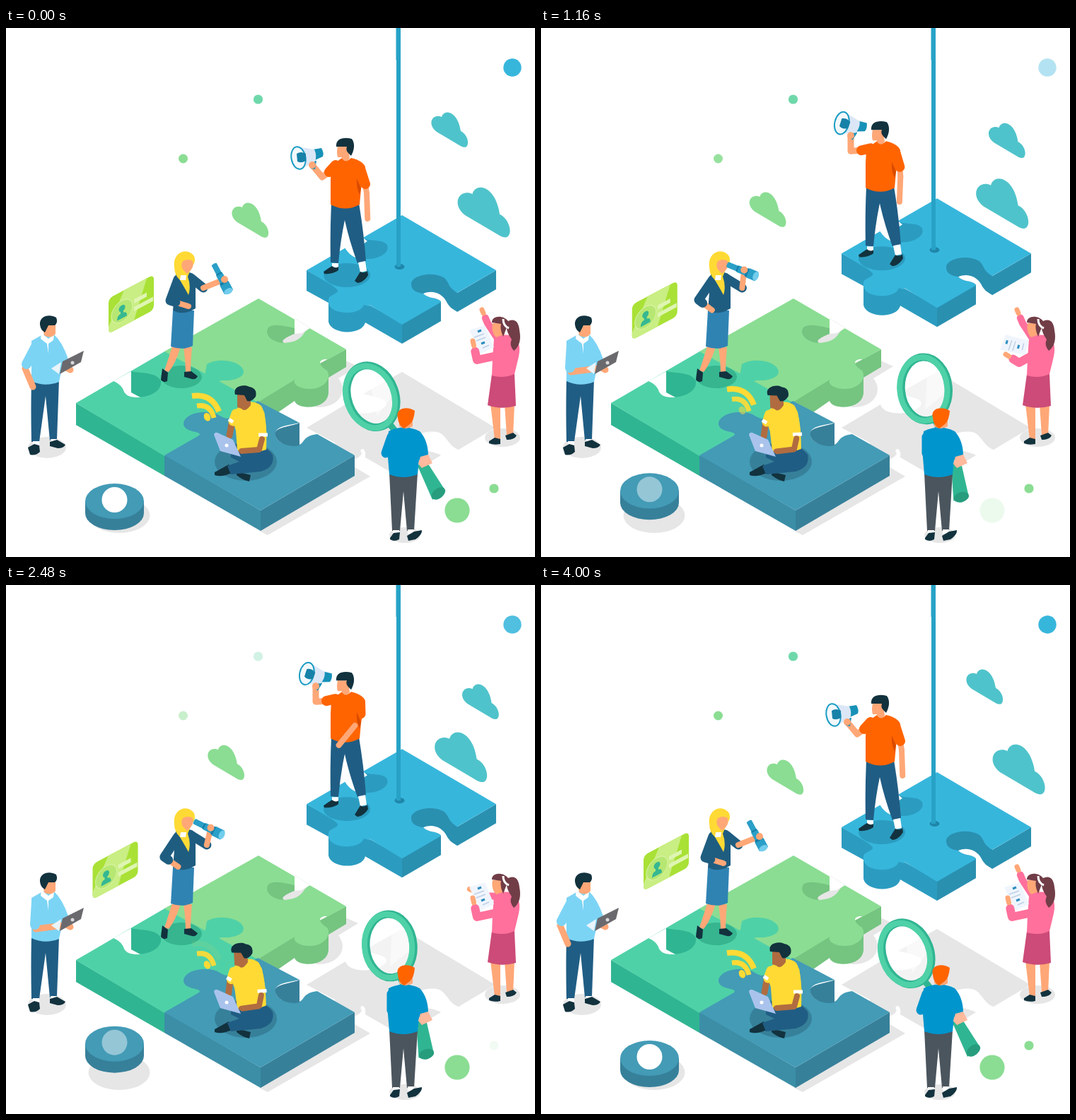
An HTML page that plays this animation: 748 px wide and 749 px high, repeating every 4.04 s.

```html
<!DOCTYPE html>
<html lang="en">
<head>
<meta charset="utf-8">
<title>Puzzle team</title>
<style>
html, body { margin: 0; height: 100%; overflow: hidden; background: #fff; }
svg { display: block; width: 100vw; height: 100vh; }
.limb { fill: none; stroke-linecap: round; stroke-linejoin: round; }
.skin { fill: #ffa777; } path.limb.skin { fill: none; stroke: #ffa777; }
.jean { fill: #205d84; }
.dark { fill: #12323e; }
.ground { fill: #e6e6e6; }
.teal { fill: #4fd1a7; }
.steel { fill: #439bb6; }
</style>
</head>
<body>
<svg viewBox="0 0 748 749">
<defs>
  <path id="cloud" d="M1 17C-2 7 7 1 15 5C18-7 38-4 42 25C51 29 55 43 50 47C47 49 43 47 40 45L8 26C4 23 2 20 1 17Z"/>
</defs>

<!-- dots and clouds -->
<circle id="dotA" cx="716" cy="56" r="12.7" fill="#37b6dc"/>
<circle id="dotB" cx="356.500" cy="101" r="6.600" fill="#6fd8ab"/>
<circle id="dotC" cx="250.500" cy="185" r="6.500" fill="#8bdd93"/>
<circle id="dotD" cx="638" cy="683" r="17.600" fill="#8bdd93"/>
<circle id="dotE" cx="690" cy="652" r="6.600" fill="#8bdd93"/>
<use href="#cloud" id="cloudA" fill="#8bdd93"/>
<use href="#cloud" id="cloudB" fill="#4fc3cb"/>
<use href="#cloud" id="cloudC" fill="#4fc3cb"/>

<!-- ground shadows -->
<g class="ground">
  <path d="M560 487L692 566L640 597C627 593 624 579 613 573C596 568 572 577 573 588C576 599 602 597 615 605L560 638L508 608C510 590 497 596 503 602C498 617 464 613 458 599C458 590 470 589 463 586L425 566L480 533C484 549 520 549 535 537C546 525 522 523 505 518Z"/>
  <path d="M358 712L370 718L515 635L490 620ZM478 470L498 479L470 496C485 515 470 538 440 537L420 528Z"/>
  <ellipse cx="160" cy="690" rx="43.500" ry="25"/>
  <ellipse cx="58" cy="594" rx="27" ry="15"/>
  <ellipse cx="564" cy="718" rx="22" ry="11"/>
  <ellipse cx="702" cy="580" rx="25" ry="13"/>
</g>

<!-- joined pieces -->
<path fill="#75c480" d="M481 455V480L456 495V517C454 541 412 541 408 528L385 544L350 525Z"/>
<path fill="#30b592" d="M99 531L224 605V634L99 562Z"/>
<path fill="#3b8ea6" d="M224 604L360 683V712L224 634Z"/>
<path fill="#37809a" d="M360 683L493 605V634L360 712Z"/>
<path class="teal" d="M99 531L226 457L360 530L224 606Z"/>
<path fill="#8bdd93" d="M357 383L481 455L456 469C438 468 443 479 454 485C461 496 450 511 430 511C409 511 404 500 410 497L356 530L224 458Z"/>
<path fill="#75c480" d="M408 411V425C398 423 379 417 371 424C364 435 378 446 394 446L430 425Z"/>
<path class="ground" d="M408 411L430 425C417 430 424 443 394 446C386 443 398 437 408 433Z"/>
<path fill="#fff" d="M408 411L430 425L418 432L408 433Z"/>
<path fill="#30b592" d="M177 486C190 489 214 487 219 500C221 514 203 524 180 523L168 518Z"/>
<path fill="#fff" d="M152 500L177 486V516L190 523Q171 524 167 515Q164 505 152 500Z"/>
<path class="teal" d="M284 476C298 467 328 470 335 483C340 494 323 500 306 499C296 500 300 505 303 511L280 498Z"/>
<path class="steel" d="M224 605L273 577C279 570 253 574 251 561C250 547 279 539 299 547C308 552 313 556 321 549L356 528L415 559C402 562 387 563 382 570C377 582 390 591 407 591C425 592 415 578 440 575L493 605L360 683Z"/>
<path fill="#37809a" d="M415 559V591C398 595 378 585 381 572C386 564 405 564 415 559Z"/>

<!-- disc -->
<g id="disc">
  <path fill="#37809a" d="M112 670V687A41.500 24 0 0 0 195 687V670Z"/>
  <ellipse class="steel" cx="153.500" cy="670" rx="41.500" ry="25"/>
  <circle id="badge" cx="153.500" cy="668" r="18" fill="#fff"/>
</g>

<!-- hanging piece with speaker -->
<path fill="#27a2c6" d="M551.500 0H555V45H551.500Z"/>
<g id="lift">
  <path fill="#2b9cc0" d="M425 343V372L456 389V416C460 435 504 435 508 417L560 447V418Z"/>
  <path fill="#2a90b0" d="M693 343V370L638 402V375ZM560 418V447L615 415V380Z"/>
  <path fill="#37b6dc" d="M560 265L693 343L560 420L514 392C507 376 493 374 503 383C512 393 500 403 483 403C463 403 452 394 457 381C470 373 474 374 462 365L425 343Z"/>
  <path fill="#37b6dc" d="M498 373Q515 377 514 394L480 385Z"/>
  <path fill="#2a90b0" d="M573 363C572 351 602 343 620 354C627 361 625 367 638 375V402L615 387C607 380 598 384 590 376C582 375 573 372 573 363Z"/>
  <path fill="#fff" d="M590 376C604 370 617 377 622 386Q627 397 638 402L615 416V387C607 380 598 384 590 376Z"/>
  <path fill="#2b9cc0" d="M505 297C512 303 530 298 538 306C545 317 528 327 512 327C498 328 485 322 480 311Z"/>
  <path fill="#fff" d="M479 311L505 297L511 302Q498 309 494 325Q485 321 479 311Z"/>
  <ellipse cx="556.500" cy="338" rx="7" ry="4" fill="#1f86aa"/>
  <path stroke="#27a2c6" stroke-width="6" d="M555 -60V338"/>
  <ellipse cx="482" cy="350" rx="33" ry="17" fill="#2b9cc0"/>

  <path class="jean" d="M460 248H499Q506 290 509 330L497 333Q485 300 479 272Q473 300 470 333L459 332Q458 290 460 248Z"/>
  <path fill="#fff" d="M461 333H470V341H461ZM498 332L508 330L510 344L501 346Z"/>
  <path class="dark" d="M449 345L461 337Q466 341 470 338V343Q462 349 450 348ZM493 358L501 345Q507 348 511 344L512 350Q506 360 497 361Z"/>
  <path class="limb skin" id="manArm" stroke-width="8"/>
  <path fill="#ff6400" d="M460 195L475 184Q482 191 488 184Q505 188 508 197L502 228L500 250Q480 261 459 250V215Z"/>
  <path class="limb" id="manSleeve" stroke="#ff6400" stroke-width="14"/>
  <path fill="#d94b00" d="M496 213L502 227L500 236Q495 226 496 213Z"/>
  <path class="limb skin" id="manFore" stroke-width="8"/>
  <path class="skin" d="M469 168H484L486 185Q481 192 475 185V183H469Q467 176 469 168Z"/>
  <path class="dark" d="M467 168C466 156 478 154 489 157C495 165 491 176 488 181L484 177Q480 173 482 168Z"/>
  <path class="limb skin" id="hornArm" stroke-width="9"/>
  <path class="limb" id="hornSleeve" stroke="#ff6400" stroke-width="14"/>
  <g id="horn">
    <path fill="#1791b8" d="M427 188L439 188L437 200L431 199ZM434 172L446 170Q450 177 448 182L437 187Z"/>
    <path fill="#dbe7f6" d="M412 168L436 172Q440 180 437 189L416 200Z"/>
    <ellipse cx="413.500" cy="184" rx="10" ry="16" transform="rotate(-10 413.500 184)" fill="#f2f8fc" stroke="#1c9dc4" stroke-width="2"/>
    <path fill="#1781a8" d="M411 178Q417 174 424 178V188Q417 192 412 189Z"/>
  </g>
  <circle class="skin" id="hornHand" r="5"/>
</g>

<!-- floating card -->
<g id="card">
  <rect width="64" height="50" rx="6" fill="#a9e136"/>
  <path fill="#c9ee83" d="M22 0H54L36 50H6Q0 50 0 44V40Z"/>
  <circle cx="19" cy="28" r="15" fill="#b7e773" stroke="#d9f3a6"/>
  <circle cx="19" cy="24" r="4.500" fill="#35b891"/>
  <path fill="#35b891" d="M17 27H21V31Q26 31 26 38H12Q12 31 17 31Z"/>
  <path fill="#def5b2" d="M36 20H54V26H36ZM36 31H63V37H36Z"/>
</g>

<!-- woman with telescope -->
<ellipse cx="248" cy="494" rx="29" ry="16" fill="#36b58f"/>
<path class="skin" d="M235 451H247Q240 475 230 487L224 485Q229 470 235 451ZM251 452H263Q261 470 261 489L254 488Q254 470 251 452Z"/>
<path class="dark" d="M221 482L229 488L228 500Q222 503 219 498ZM252 487L262 486L271 493Q269 498 263 497L252 494Z"/>
<path fill="#2f83b3" d="M236 400H266L264 450Q250 457 233 451Z"/>
<path class="limb" id="scopeSleeve" stroke="#1f5d80" stroke-width="13"/>
<path fill="#1f5d80" d="M240 349Q262 341 268 352V397Q252 408 236 400L238 375Z"/>
<path class="limb skin" id="hipArm" stroke-width="8"/>
<path class="limb" id="hipSleeve" stroke="#1f5d80" stroke-width="13"/>
<path fill="#ffda35" d="M238 338C235 318 256 309 266 323Q269 332 263 337L257 352Q262 366 258 378Q252 367 246 357Q238 350 238 338Z"/>
<path class="skin" d="M250 330Q258 326 264 330Q266 338 261 343L256 348L251 343Q246 337 250 330Z"/>
<path fill="#fff" d="M247 350L255 350L254 357L246 357Z"/>
<path class="limb skin" id="scopeArm" stroke-width="8"/>
<g id="scope">
  <path fill="#2a9fc7" d="M-23 -4H-9L-7 -5H5L8 -7H21Q26 0 21 7H8L5 5H-7L-9 4H-23Q-25 0 -23 -4Z"/>
  <path fill="#177ca5" d="M-9 -4H-7V4H-9ZM5 -6H8V6H5Z"/>
  <ellipse cx="20" rx="4" ry="6.500" fill="#72cdec"/>
</g>
<circle class="skin" id="scopeHand" r="5"/>

<!-- man with tablet -->
<path class="jean" d="M36 498H75L72 583L62 584L56 521L47 586H36Q35 540 36 498Z"/>
<path fill="#fff" d="M38 585H47V592H38ZM63 582H72V588H63Z"/>
<path class="dark" d="M31 594L40 589L47 591L48 600Q42 606 34 604ZM62 586L72 583L84 590Q82 595 73 595L62 592Z"/>
<path class="limb skin" stroke-width="9" d="M80 478L91 484"/>
<path fill="#7cd4f5" d="M36 443L52 434H68Q80 445 88 469L78 487L75 501Q55 509 36 500Z"/>
<path fill="#fff" d="M50 432L60 440L68 434L67 442L60 447L60 461L58 447L49 440Z"/>
<path class="skin" d="M51 419H70V433Q63 441 54 435Z"/>
<path class="dark" d="M48 420C47 408 61 404 71 410Q74 417 69 421H60L55 431Q49 428 48 420Z"/>
<path class="limb skin" id="tabArm" stroke-width="9"/>
<path class="limb" id="tabSleeve" stroke="#7cd4f5" stroke-width="14"/>
<path fill="#eaf4fb" d="M64 482L78 473L75 490Z"/>
<path fill="#6a6a6e" d="M80 472L110 457L106 473L76 490Z"/>
<circle cx="94" cy="474" r="2.500" fill="#d9d9db"/>

<!-- signal -->
<g id="signal" fill="none" stroke="#ffda35" stroke-width="8">
  <path id="arcOut" d="M263 521Q291 517 301 543"/>
  <path id="arcIn" d="M270 535Q289 532 294 552" stroke-width="7"/>
  <ellipse id="arcDot" cx="284.500" cy="551" rx="4.500" ry="6" transform="rotate(-25 284 551)" fill="#ffda35" stroke="none"/>
</g>

<!-- seated man -->
<ellipse cx="339" cy="614" rx="44" ry="27" fill="#37809a"/>
<path class="dark" d="M295 629L315 618L321 629Q305 637 295 633ZM326 628L346 633L344 642Q334 640 326 633Z"/>
<path class="jean" d="M322 590Q362 584 377 604Q381 622 360 628L318 632L313 620L338 611L320 604Z"/>
<g id="sitter">
  <path fill="#ffda35" d="M318 546L331 535Q348 524 361 535Q370 550 368 597Q345 605 327 598L325 570Z"/>
  <path class="limb" stroke="#b06c40" stroke-width="9" d="M320 555L316 577"/>
  <path class="limb" stroke="#ffda35" stroke-width="13" d="M325 546L321 557M359 546L362 574"/>
  <path stroke="#fff" stroke-width="5" d="M357 576H370M315 554L321 558"/>
  <path class="limb" stroke="#b06c40" stroke-width="8" d="M362 582L358 597L333 599"/>
  <path fill="#b06c40" d="M327 518H346V534Q338 545 333 539L327 537Z"/>
  <path class="dark" d="M324 519C320 506 338 504 344 508Q356 510 353 522Q347 530 341 528L337 520Z"/>
</g>
<path class="jean" d="M318 590Q340 612 346 610L336 617L318 608Z"/>
<path fill="#a9c3ec" d="M294 576Q295 572 299 573L321 583L332 607L303 599Z"/>
<circle cx="312" cy="591" r="2.500" fill="#fff"/>

<!-- magnifier and its holder -->
<g id="handle">
  <path fill="#30b592" d="M582 620L593 611L620 653L603 668Z"/>
  <ellipse cx="611.500" cy="659" rx="11" ry="7" fill="#279d7e" transform="rotate(-38 611.500 659)"/>
</g>
<g id="glass">
  <path stroke="#30b592" stroke-width="9" d="M542 560L560 583"/>
  <g transform="rotate(-20 516 522)">
    <ellipse cx="516" cy="522" rx="33" ry="44" fill="#fff" fill-opacity=".55"/>
    <path fill="#fff" opacity=".5" d="M521 507L545 494L546 530L515 551Z"/>
    <ellipse cx="517" cy="522" rx="33.500" ry="45" fill="none" stroke="#30b592" stroke-width="11"/>
    <ellipse cx="515" cy="522" rx="33.500" ry="45" fill="none" stroke="#4fd1a7" stroke-width="8"/>
  </g>
</g>
<path fill="#4b555d" d="M542 630H582L577 712H567L562 656L557 712H546Z"/>
<path fill="#fff" d="M547 711H556V717H547ZM568 710H577V716H568Z"/>
<path class="dark" d="M543 722L548 715L557 714L556 724Q549 728 543 724ZM567 719L577 713L588 711Q589 717 579 724L569 726Z"/>
<path fill="#0095cd" d="M541 571Q563 560 585 571Q597 584 597 606L584 612L582 632Q562 640 542 632L539 596Z"/>
<path class="limb" id="backSleeve" stroke="#0095cd" stroke-width="13"/>
<path fill="#ffb99c" d="M586 607L597 604L603 616L588 623L583 617Z"/>
<path class="skin" d="M556 552H575V564Q565 570 556 564Z"/>
<path fill="#ff6400" d="M554 552C550 536 570 536 578 542Q577 556 571 561L563 567Q555 563 554 552Z"/>

<!-- woman with paper -->
<path class="skin" d="M685 532H699V583H691ZM705 533H719L717 577H708Z"/>
<path class="dark" d="M683 585L691 580L699 582V589Q690 591 683 588ZM706 577L717 573L722 577Q719 583 708 583Z"/>
<path fill="#cc4b78" d="M687 490H719L721 535Q700 541 681 534Z"/>
<path class="limb" id="upSleeve" stroke="#ff709c" stroke-width="10"/>
<path class="limb skin" id="upHand" stroke-width="7"/>
<path class="skin" d="M688 418H705V434Q697 442 691 436Q686 428 688 418Z"/>
<path fill="#ff709c" d="M690 440Q705 431 718 437Q729 445 725 465L719 490Q703 497 687 492L688 468Z"/>
<path fill="#713d47" d="M687 417C687 407 703 406 710 415Q724 409 726 428Q730 448 718 457Q711 449 715 441Q708 431 708 424L703 437Q698 426 700 419Z"/>
<path fill="none" stroke="#fff" stroke-width="3" d="M703 412Q703 422 711 425"/>
<g id="paper">
  <path fill="#f0f5fd" d="M655 428L677 421L690 452L671 461Z"/>
  <path stroke="#2e8fc0" stroke-width="3" d="M667 430L672 428M672 447L677 445"/>
  <path stroke="#bfd0e6" stroke-width="1.500" d="M662 438L676 433M665 443L678 438M674 453L683 449"/>
</g>
<path class="limb" id="lowSleeve" stroke="#ff709c" stroke-width="12"/>
<path class="limb skin" id="lowHand" stroke-width="7"/>
</svg>

<script>
const $ = id => document.getElementById(id);
const move = (id, v) => $(id).setAttribute('transform', v);
const mix = (a, b, k) => a.map((v, i) => v + (b[i] - v) * k);
const line = (id, ...points) => $(id).setAttribute('d', 'M' + points.join('L'));
const alpha = (id, v) => $(id).setAttribute('opacity', v);
const clamp = v => Math.max(0, Math.min(1, v));
const ease = (t, a, b) => { const k = clamp((t - a) / (b - a)); return k * k * (3 - 2 * k); };
// Rises over a..b and falls over c..d.
const pulse = (t, a, b, c, d) => ease(t, a, b) - ease(t, c, d);
// Fully faded at the centre, solid beyond the half width.
const dip = (t, centre, half) => clamp(Math.abs(t - centre) / half);

function drawSpeaker(t) {
  const k = pulse(t, 0, 680, 3160, 4000);
  const elbow = mix([447, 211], [438, 198], k), hand = mix([433, 194], [438, 176], k);
  const cuff = mix([457, 204], [453, 197], k);
  line('hornArm', cuff, elbow, hand);
  line('hornSleeve', [466, 194], cuff);
  move('hornHand', `translate(${hand})`);
  move('horn', `translate(${12 * k} ${-18.5 * k}) rotate(${23 * k} 431 180)`);

  const q = pulse(t, 1000, 1960, 2120, 3160), a = (88 + 57 * q) * Math.PI / 180;
  const bend = mix([510, 234], [487, 231], q), end = mix([508, 221], [499, 213], q);
  const palm = [bend[0] + 36 * Math.cos(a), bend[1] + 36 * Math.sin(a)];
  line('manArm', end, bend);
  line('manSleeve', [501, 199], end);
  line('manFore', bend, palm);
}

function drawScope(t) {
  const k = pulse(t, 160, 1400, 2160, 3320);
  const elbow = mix([279, 368], [285, 368], k), hand = mix([309, 356], [285, 341], k);
  line('scopeSleeve', [263, 355], elbow);
  line('scopeArm', elbow, hand);
  move('scope', `translate(${mix([305, 355], [283, 342.5], k)}) rotate(${62 - 44 * k})`);
  move('scopeHand', `translate(${hand})`);
  const bend = mix([232, 386], [222, 385], k), palm = mix([258, 394], [240, 400], k);
  line('hipSleeve', [243, 356], bend, mix(bend, palm, .3));
  line('hipArm', bend, palm);
}

function drawOthers(t, p) {
  const k = pulse(t, 0, 760, 2880, 3880);
  const elbow = mix([27, 482], [42, 487], k), hand = mix([38, 508], [80, 482], k);
  line('tabSleeve', [43, 449], mix([29, 476], [41, 481], k));
  line('tabArm', elbow, hand);

  move('sitter', `rotate(${-4 * p} 345 600)`);

  const g = pulse(t, 0, 1200, 2400, 3640);
  move('glass', `rotate(${15 * g} 571 615)`);
  move('handle', `rotate(${20 * g} 588 613)`);
  line('backSleeve', [545, 579], mix([537, 602], [545, 602], g));

  const w = pulse(t, 1640, 2640, 2800, 3920);
  const top = mix([673, 399], [654, 433], w), mid = mix([681, 418], [683, 442], w);
  line('upSleeve', [696, 441], mid, mix(mid, top, .4));
  line('upHand', mix(mid, top, .75), top);

  const v = pulse(t, 0, 680, 1560, 2160);
  move('paper', `translate(${-2 * v} ${10 * v}) rotate(${-52 * v} 671 441)`);
  const low = mix([666, 470], [676, 474], v), fist = mix([660, 443], [657, 462], v);
  line('lowSleeve', [694, 464], low, mix(low, fist, .45));
  line('lowHand', mix(low, fist, .75), fist);
}

function draw(t) {
  const p = (1 - Math.cos(2 * Math.PI * t / 4000)) / 2;
  move('lift', `translate(0 ${-38 * p})`);
  move('disc', `translate(0 ${-23.5 * p})`);
  move('signal', `translate(0 ${-15 * p})`);
  move('card', `matrix(1 -.53 0 1 ${145 - 26 * p} ${383 + 14 * p})`);
  move('cloudA', `translate(${319 - 39.5 * p} ${249 - 24 * p})`);
  move('cloudB', `translate(${601 + 50.5 * p} ${121 + 24.5 * p})`);
  move('cloudC', `translate(${638 - 37.5 * p} ${228 - 20 * p}) scale(1.43)`);

  alpha('dotA', dip(t, 1560, 1050));
  alpha('dotB', dip(t, 2800, 1000));
  alpha('dotC', dip(t, 2020, 960));
  alpha('dotD', dip(t, 1000, 1000));
  alpha('dotE', dip(t, 2380, 900));
  alpha('arcDot', dip(t, 800, 680));
  alpha('arcIn', dip(t, 1810, 720));
  alpha('arcOut', dip(t, 2430, 640));
  alpha('badge', dip(t % 2000, 820, 790));

  drawSpeaker(t);
  drawScope(t);
  drawOthers(t, p);
}

function tick() {
  draw(Math.floor(performance.now() % 4040 / 40) * 40);
  requestAnimationFrame(tick);
}
tick();
</script>
</body>
</html>
```
